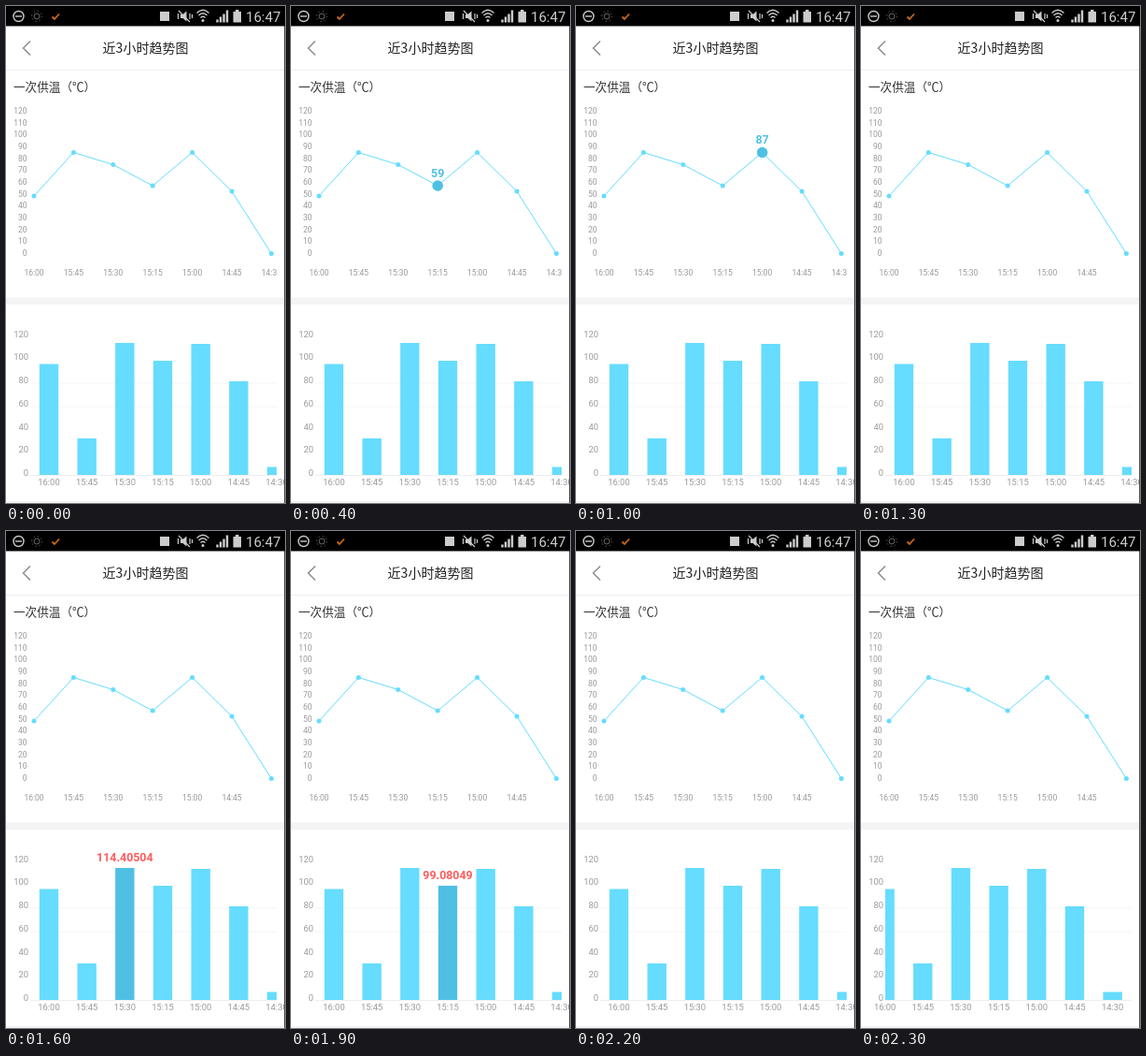
An HTML page for the animation above (2400 ms loop, 299 by 531 pixels).

```html
<!DOCTYPE html>
<html lang="zh">
<head>
<meta charset="utf-8">
<title>趋势图</title>
<style>
html, body { margin: 0; width: 100%; height: 100%; overflow: hidden; background: #fff; }
svg { display: block; width: 100%; height: 100%; }
text { font-family: Roboto, sans-serif; }
.cjk { font-family: "Noto Sans CJK SC", "Noto Sans CJK", sans-serif; }
.axis { fill: #999; }
.tag { font-weight: 700; font-size: 12.4px; text-anchor: middle; }
.icon { fill: none; stroke: #ccc; stroke-width: 1.4; }
</style>
</head>
<body>
<svg viewBox="0 0 299 531">
  <defs>
    <clipPath id="plot"><rect x="26" y="340" width="264" height="165"/></clipPath>
    <clipPath id="lineClip"><rect x="19" y="100" width="271" height="200"/></clipPath>
  </defs>
  <rect width="299" height="531" fill="#fff"/>
  <rect y="311.5" width="299" height="7.5" fill="#f4f4f4"/>
  <rect y="529" width="299" height="2" fill="#f4f4f4"/>
  <rect y="68" width="299" height="1" fill="#eee"/>

  <path d="M26 37.5L18.5 45L26 52.5" fill="none" stroke="#8c8c8c" stroke-width="1.5"/>
  <text class="cjk" x="149.5" y="50" font-size="14" text-anchor="middle" fill="#222">近3小时趋势图</text>
  <text class="cjk" x="8" y="90.5" font-size="12.6" fill="#333">一次供温（℃）</text>

  <g id="line"></g>
  <g id="bars"></g>

  <rect x="298" y="21" width="1" height="510" fill="#555"/>
  <rect width="299" height="21.5" fill="#000"/>
  <g class="icon">
    <circle cx="13.5" cy="11" r="5.5"/>
    <path d="M10 11h7"/>
    <g stroke="#666" stroke-width="1">
      <circle cx="33" cy="11" r="3"/>
      <circle cx="33" cy="11" r="5.4" stroke-dasharray="1.4 2.84"/>
    </g>
    <path d="M49.5 11.5l2.5 2.5l5-5.5" stroke="#c8691e" stroke-width="1.8"/>
    <path d="M187 9h2.500l4-3.500v11l-4-3.500h-2.500z" fill="#ccc" stroke="none"/>
    <path d="M185 5l12 12M184.500 8v6M197 8v6M199.500 9v4" stroke-width="1.200"/>
    <path d="M204.500 7.500q6.500-6.500 13 0M206.500 10q4.500-4.500 9 0M208.500 12.500q2.500-2.500 5 0"/>
    <circle cx="211" cy="15.500" r="1.500" fill="#ccc" stroke="none"/>
    <path d="M226.500 17.500v-3M230 17.500v-6M233.500 17.500v-9M237 17.500v-13" stroke-width="2.400"/>
  </g>
  <rect x="165" y="6" width="10" height="10" fill="#ccc"/>
  <path d="M243.500 6h2.500v-2h3.500v2h2.500v11.500h-8.500z" fill="#ccc"/>
  <text x="257" y="17" font-size="15" fill="#ccc">16:47</text>
</svg>
<script>
const LOOP = 2400;
const BLUE = '#66dcff', DARK = '#4fc0e4', RED = '#ff5d5d';
const times = ['16:00', '15:45', '15:30', '15:15', '15:00', '14:45', '14:30'];
const dotY = [203, 156.5, 169.5, 192, 156.5, 198, 264.5];
const barTop = [382.5, 462, 360, 379, 361, 401, 492.5];
const dotTag = { 3: '59', 4: '87' };
const barTag = { 2: '114.40504', 3: '99.08049' };
const BASE = 501;

const dotX = i => 30 + i * 42.4;
const barX = i => 46 + i * 40.67;

function add(parent, tag, attrs, text) {
  const el = document.createElementNS('http://www.w3.org/2000/svg', tag);
  for (const k in attrs) el.setAttribute(k, attrs[k]);
  if (text !== undefined) el.textContent = text;
  return parent.appendChild(el);
}

function label(parent, x, y, size, anchor, text) {
  return add(parent, 'text',
    { x, y, class: 'axis', 'font-size': size, 'text-anchor': anchor }, text);
}

// Line chart
const line = document.getElementById('line');
for (let v = 0; v <= 120; v += 10) label(line, 22.5, 267 - v * 1.268, 8.5, 'end', v);
const lineBody = add(line, 'g', { 'clip-path': 'url(#lineClip)' });
add(lineBody, 'polyline', {
  points: dotY.map((y, i) => dotX(i) + ',' + y).join(' '),
  fill: 'none', stroke: BLUE, 'stroke-width': 1
});
const dots = dotY.map((y, i) => add(lineBody, 'circle', { cx: dotX(i), cy: y }));
const dotLabels = times.map((t, i) => label(lineBody, dotX(i), 288, 8.5, 'middle', t));
const dotText = add(line, 'text', { class: 'tag', fill: DARK });

// Bar chart
const bars = document.getElementById('bars');
for (let v = 0; v <= 120; v += 20) label(bars, 24, 502.2 - v * 1.238, 9.4, 'end', v);
for (const y of [402.5, 427.5]) add(bars, 'rect', { x: 26, y, width: 264, height: 1, fill: '#f6f6f6' });
add(bars, 'rect', { x: 26, y: BASE, width: 264, height: 1, fill: '#eee' });
const clipped = add(bars, 'g', { 'clip-path': 'url(#plot)' });
const barRow = add(clipped, 'g', {});
const rects = barTop.map((y, i) =>
  add(barRow, 'rect', { x: barX(i) - 10.2, y, width: 20.4, height: BASE - y }));
const barLabels = add(bars, 'g', {});
times.forEach((t, i) => label(barLabels, barX(i), 512.3, 9.4, 'middle', t));
const barText = add(bars, 'text', { class: 'tag', fill: RED });

function showTag(el, text, x, y) {
  el.textContent = text || '';
  el.setAttribute('x', x);
  el.setAttribute('y', y);
}

function render(t) {
  const dot = t < 400 ? -1 : t < 700 ? 3 : t < 1200 ? 4 : -1;
  const bar = t < 1500 ? -1 : t < 1900 ? 2 : t < 2100 ? 3 : -1;
  const scroll = t < 2300 ? 0 : -20.4;

  dots.forEach((el, i) => {
    el.setAttribute('r', i === dot ? 5.8 : 2.5);
    el.setAttribute('fill', i === dot ? DARK : BLUE);
  });
  rects.forEach((el, i) => el.setAttribute('fill', i === bar ? DARK : BLUE));
  showTag(dotText, dotTag[dot], dotX(dot), (dotY[dot] || 0) - 9.2);
  showTag(barText, barTag[bar], barX(bar), (barTop[bar] || 0) - 6.7);
  dotLabels[6].setAttribute('visibility', t < 1200 ? 'visible' : 'hidden');
  for (const g of [barRow, barLabels]) g.setAttribute('transform', `translate(${scroll} 0)`);
}

const start = performance.now();
function tick() {
  render((performance.now() - start) % LOOP);
  requestAnimationFrame(tick);
}
tick();
</script>
</body>
</html>
```
